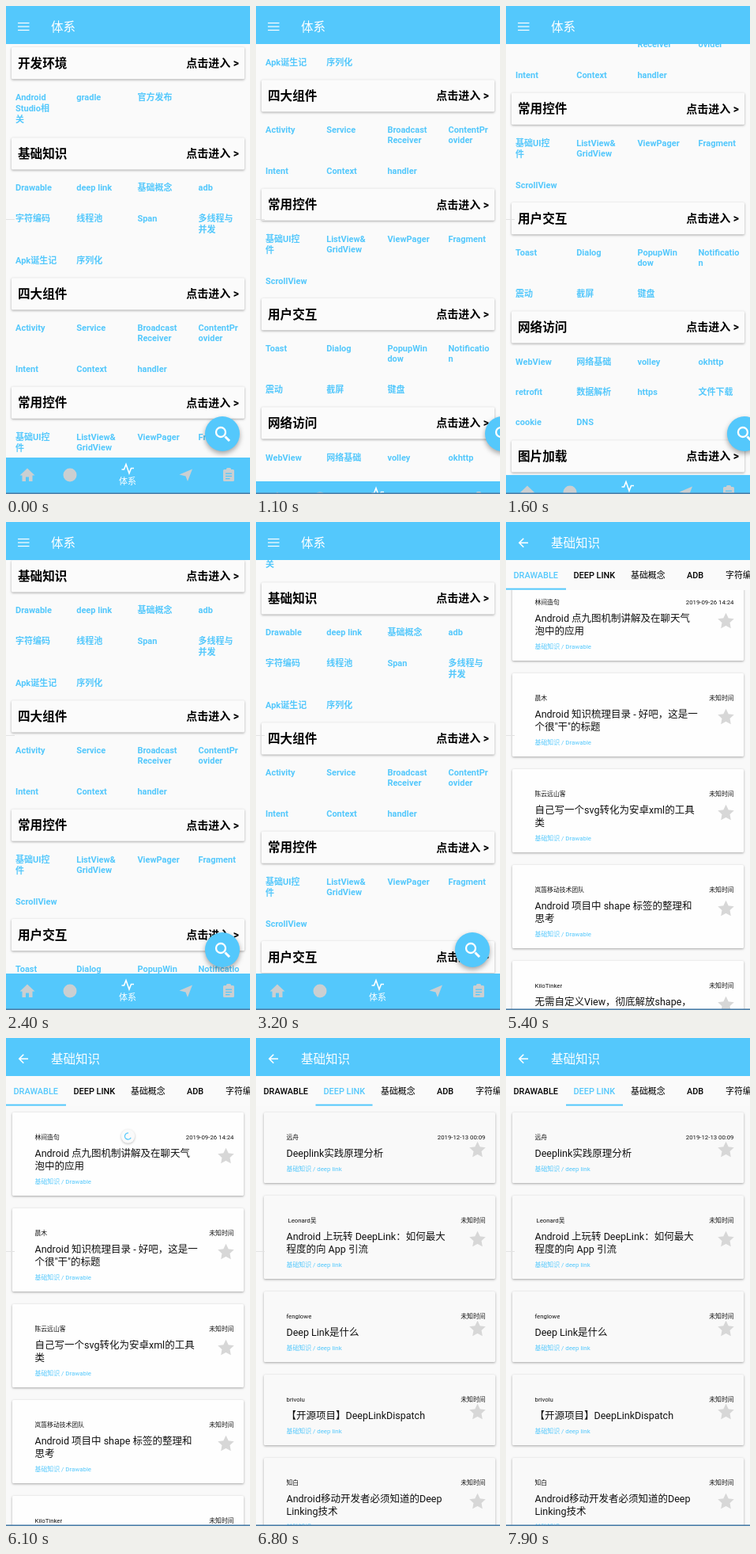
An HTML page with a canvas for the animation above (8 s loop, 309x616 px).

```html
<!DOCTYPE html>
<html lang="zh-CN">
<head>
<meta charset="utf-8">
<title>体系</title>
<style>
  html, body { margin: 0; width: 100%; height: 100%; overflow: hidden; background: #fafafa; }
  canvas { display: block; width: 309px; height: 616px; }
</style>
</head>
<body>
<canvas id="stage"></canvas>
<script>
const W = 309, H = 616, LOOP = 8000, STEP = 100;
const BLUE = '#54c8fc', BG = '#fafafa', GREY = '#cbcfd1';
const FONT = 'Roboto, "Noto Sans CJK SC", "Noto Sans CJK", sans-serif';
const canvas = document.getElementById('stage');
const dpr = window.devicePixelRatio || 1;
canvas.width = W * dpr;
canvas.height = H * dpr;
const g = canvas.getContext('2d');

// y is the centre of the header, rows are [y, items]; "|" breaks a line
const sections = [
  { y: 72, name: '开发环境', rows: [[115, 'Android|Studio相|关', 'gradle', '官方发布']] },
  { y: 186.3, name: '基础知识', rows: [
    [229, 'Drawable', 'deep link', '基础概念', 'adb'],
    [267.7, '字符编码', '线程池', 'Span', '多线程与|并发'],
    [320.5, 'Apk诞生记', '序列化']] },
  { y: 363.3, name: '四大组件', rows: [
    [406.3, 'Activity', 'Service', 'Broadcast|Receiver', 'ContentPr|ovider'],
    [457.8, 'Intent', 'Context', 'handler']] },
  { y: 500.5, name: '常用控件', rows: [
    [543.5, '基础UI控|件', 'ListView&|GridView', 'ViewPager', 'Fragment'],
    [596.5, 'ScrollView']] },
  { y: 639, name: '用户交互', rows: [
    [682, 'Toast', 'Dialog', 'PopupWin|dow', 'Notificatio|n'],
    [734, '震动', '截屏', '键盘']] },
  { y: 776.3, name: '网络访问', rows: [
    [819.5, 'WebView', '网络基础', 'volley', 'okhttp'],
    [858, 'retrofit', '数据解析', 'https', '文件下载'],
    [896.3, 'cookie', 'DNS']] },
  { y: 939.3, name: '图片加载', rows: [[982.5, 'glide', 'picasso', 'fresco']] }
];

const NO_DATE = '未知时间';
const pages = [
  { tag: 'Drawable', fill: '#fefefe', posts: [
    ['林间造句', '2019-09-26 14:24', 'Android 点九图机制讲解及在聊天气|泡中的应用'],
    ['晨木', NO_DATE, 'Android 知识梳理目录 - 好吧，这是一|个很"干"的标题'],
    ['陈云远山客', NO_DATE, '自己写一个svg转化为安卓xml的工具|类'],
    ['岚笛移动技术团队', NO_DATE, 'Android 项目中 shape 标签的整理和|思考'],
    ['KiloTinker', NO_DATE, '无需自定义View，彻底解放shape，|selector吧']] },
  { tag: 'deep link', fill: '#f9f9f9', posts: [
    ['远舟', '2019-12-13 00:09', 'Deeplink实践原理分析'],
    [' Leonard吴', NO_DATE, 'Android 上玩转 DeepLink：如何最大|程度的向 App 引流'],
    ['fenglowe', NO_DATE, 'Deep Link是什么'],
    ['brivolu', NO_DATE, '【开源项目】DeepLinkDispatch'],
    ['知白', NO_DATE, 'Android移动开发者必须知道的Deep|Linking技术']] }
];
const tabs = [['DRAWABLE', 9.5], ['DEEP LINK', 85.5], ['基础概念', 158], ['ADB', 229], ['字符编码', 278]];

// Motion: [time, value] points
const scrollPts = [[700, 0], [800, 20], [1000, 170], [1200, 330], [1400, 400], [1500, 395], [1600, 371],
  [1800, 290], [2000, 210], [2200, 150], [2400, 118], [2600, 104], [2900, 94], [3200, 90]];
const hidePts = [[900, 0], [1200, 1], [1500, 1], [1600, 0.49], [1700, 0]];
const openPts = [[4200, 0], [4300, 0.2], [4400, 0.6], [4500, 0.9], [4600, 1]];
const postPts = [[5300, 0], [5400, 24], [5500, 46], [5600, 34], [5700, 10], [5800, 0]];
const pullPts = [[5600, 0], [5900, 1]];
const shrinkPts = [[6000, 1], [6300, 0]];
const swipePts = [[6400, 0], [6500, 60], [6600, 185], [6700, 280], [6800, 307], [7300, 308], [7900, 309]];

function track(pts, t) {
  if (t <= pts[0][0]) return pts[0][1];
  for (let i = 1; i < pts.length; i++) {
    const [t0, v0] = pts[i - 1], [t1, v1] = pts[i];
    if (t <= t1) return v0 + (v1 - v0) * (t - t0) / (t1 - t0);
  }
  return pts[pts.length - 1][1];
}

// y is the visual middle of the line
function text(s, x, y, size, color, weight = 400, align = 'left') {
  g.font = `${weight} ${size}px ${FONT}`;
  g.fillStyle = color;
  g.textAlign = align;
  g.fillText(s, x, y + size * 0.37);
}

function rect(x, y, w, h, color) {
  g.fillStyle = color;
  g.fillRect(x, y, w, h);
}

function line(color, width, ...pts) {
  g.strokeStyle = color;
  g.lineWidth = width;
  g.beginPath();
  pts.forEach(([x, y]) => g.lineTo(x, y));
  g.stroke();
}

function poly(color, ...pts) {
  g.fillStyle = color;
  g.beginPath();
  pts.forEach(([x, y]) => g.lineTo(x, y));
  g.fill();
}

function disc(x, y, r, color) {
  g.fillStyle = color;
  g.beginPath();
  g.arc(x, y, r, 0, Math.PI * 2);
  g.fill();
}

function shadowed(blur, dy, alpha, draw) {
  g.save();
  g.shadowColor = `rgba(0,0,0,${alpha})`;
  g.shadowBlur = blur * dpr;
  g.shadowOffsetY = dy * dpr;
  draw();
  g.restore();
}

function card(x, y, w, h, color) {
  shadowed(3, 1, 0.34, () => {
    g.fillStyle = color;
    g.beginPath();
    g.roundRect(x, y, w, h, 1.5);
    g.fill();
  });
}

function star(x, y) {
  g.beginPath();
  for (let i = 0; i < 10; i++) {
    const a = -Math.PI / 2 + i * Math.PI / 5, r = i % 2 ? 4.6 : 9.4;
    g.lineTo(x + r * Math.cos(a), y + r * Math.sin(a));
  }
  g.closePath();
  g.fillStyle = g.strokeStyle = '#d7d7d7';
  g.lineWidth = 1.2;
  g.fill();
  g.stroke();
}

function appBar(title) {
  rect(0, 0, W, 48, BLUE);
  text(title, 57, 26.5, 15.5, '#fff', 500);
}

function edges() {
  rect(0, 269, 11, 1, '#e2e2e2');
  rect(0, 614.4, W, 1.6, '#4c7fa9');
}

function sectionList(scroll) {
  for (const { y, name, rows } of sections) {
    const cy = y - scroll;
    card(7, cy - 20, 295, 40.3, '#fbfbfb');
    text(name, 15, cy, 15.6, '#000', 700);
    text('点击进入 >', 295, cy, 14, '#000', 700, 'right');
    for (const [ry, ...items] of rows) {
      items.forEach((item, col) => {
        const gap = /[一-龥]/.test(item) ? 14.2 : 13;
        item.split('|').forEach((s, i) =>
          text(s, 12 + col * 77.2, ry - scroll + i * gap, 11, BLUE, 700));
      });
    }
  }
}

function searchButton(dx) {
  const x = 274 + dx, y = 540;
  shadowed(6, 3, 0.35, () => disc(x, y, 22, BLUE));
  g.strokeStyle = '#fff';
  g.lineWidth = 2.3;
  g.beginPath();
  g.arc(x - 2, y - 2, 6, 0, Math.PI * 2);
  g.stroke();
  line('#fff', 3, [x + 3.5, y + 3.5], [x + 9, y + 9]);
}

function bottomBar(dy) {
  g.save();
  g.translate(0, dy);
  rect(0, 570, W, 46, BLUE);
  poly(GREY, [27, 583.5], [36.5, 592.5], [33.5, 592.5], [33.5, 600], [29, 600], [29, 594.5],
    [25, 594.5], [25, 600], [20.5, 600], [20.5, 592.5], [17.5, 592.5]);
  disc(81, 592, 8.5, GREY);
  line('#fff', 1.6, [146.5, 585], [149.5, 585], [152, 578.5], [156, 590], [158.5, 583.5], [162, 583.5]);
  text('体系', 154, 600, 11, '#fff', 400, 'center');
  poly(GREY, [236, 584.5], [230, 600], [227.5, 593.5], [219.5, 591.5]);
  g.fillStyle = GREY;
  g.beginPath();
  g.roundRect(275, 585, 14, 15, 1.5);
  g.roundRect(279, 583, 6, 4, 1.5);
  g.fill();
  [589.5, 592.8, 596].forEach((y, i) => rect(278, y, i < 2 ? 8 : 5.5, 1.3, BLUE));
  g.restore();
}

function home(t) {
  const hide = track(hidePts, t);
  rect(0, 0, W, H, BG);
  sectionList(track(scrollPts, t));
  searchButton(hide * 57);
  bottomBar(hide * 45);
  appBar('体系');
  [21.5, 26, 30.5].forEach(y => line('#fff', 1.2, [15, y], [29.5, y]));
  edges();
}

function postList({ tag, fill, posts }, x, top) {
  g.save();
  g.translate(x, 0);
  for (const [author, date, title] of posts) {
    const lines = title.split('|'), h = 73 + lines.length * 16;
    card(8, top, 293, h, fill);
    text(author, 36.5, top + 31, 7.8, '#111');
    text(date, 288.5, top + 31, 7.8, '#111', 400, 'right');
    lines.forEach((s, i) => text(s, 36.5, top + 51 + i * 16.3, 12.5, '#111'));
    text('基础知识 / ' + tag, 36.5, top + h - 17.5, 7.9, BLUE);
    star(278.5, top + h / 2 + 3);
    top += h + 16;
  }
  g.restore();
}

function spinner(t) {
  const pull = track(pullPts, t), size = track(shrinkPts, t);
  if (!pull || !size) return;
  g.save();
  g.translate(154.5, 70 + pull * 54);
  g.scale(size, size);
  shadowed(3, 1, 0.25, () => disc(0, 0, 13, BG));
  g.strokeStyle = BLUE;
  g.lineWidth = 1.9;
  g.beginPath();
  g.arc(0, 0, 6, t / 160, t / 160 + 4.4);
  g.stroke();
  g.restore();
}

function tabBar(p) {
  rect(0, 48, W, 38, BG);
  const active = p > 0.5 ? 1 : 0;
  tabs.forEach(([name, x], i) => text(name, x, 67, 10.9, i === active ? BLUE : '#000', 500));
  rect(76 * p, 83.6, 76 - 4 * p, 2, BLUE);
}

function detail(t) {
  const x = track(swipePts, t);
  rect(0, 0, W, H, '#f9f9f9');
  if (x < W) postList(pages[0], -x, 94 - track(postPts, t));
  if (x > 0) postList(pages[1], W - x, 94);
  if (x === 0) spinner(t);
  tabBar(x / W);
  appBar('基础知识');
  line('#fff', 1.6, [28, 26.3], [17, 26.3]);
  line('#fff', 1.6, [22.3, 20.8], [16.8, 26.3], [22.3, 31.8]);
  edges();
}

function draw(now) {
  const t = Math.floor(now % LOOP / STEP) * STEP;
  const open = track(openPts, t);
  g.setTransform(dpr, 0, 0, dpr, 0, 0);
  if (open < 1) home(t);
  if (open > 0) {
    g.save();
    g.globalAlpha = open;
    g.translate(0, (1 - open) * 50);
    detail(t);
    g.restore();
  }
}

const start = performance.now();
function frame() {
  draw(performance.now() - start);
  requestAnimationFrame(frame);
}
frame();
</script>
</body>
</html>
```
